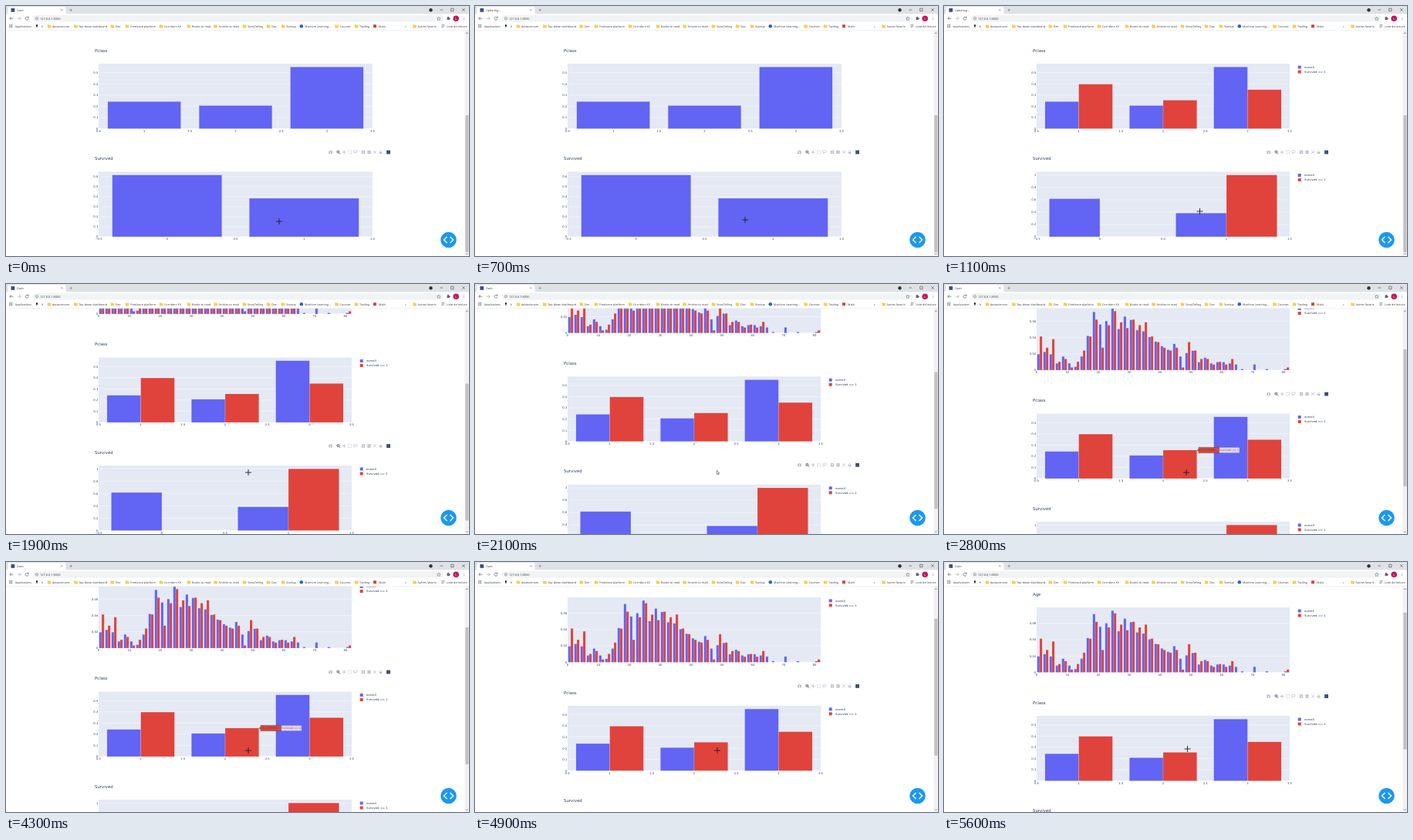
An HTML page for the animation above (5700 ms loop, 600 px wide and 325 px high).

```html
<!DOCTYPE html>
<html lang="en">
<head>
<meta charset="utf-8">
<title>Dash</title>
<style>
html, body { margin: 0; width: 100%; height: 100%; overflow: hidden; background: #fff; }
svg { display: block; width: 100vw; height: 100vh; }
text { text-rendering: geometricPrecision; white-space: pre; }
.plot text { font-family: "DejaVu Sans", sans-serif; fill: #2a3f5f; }
.browser text { font-family: "Open Sans", sans-serif; fill: #3c4043; }
</style>
</head>
<body>
<svg id="stage" viewBox="0 0 600 325" preserveAspectRatio="none"></svg>
<script>
const LOOP = 5700, STEP = 100;
const BLUE = '#6264f3', RED = '#e0433b', PLOT_BG = '#e4e9f4', INK = '#2a3f5f';
const LEFT = 120, PLOT_HEIGHT = 84.5;
const stage = document.getElementById('stage');

function add(parent, tag, attrs = {}, content) {
  const node = document.createElementNS('http://www.w3.org/2000/svg', tag);
  for (const name in attrs) node.setAttribute(name, attrs[name]);
  if (content !== undefined) node.textContent = content;
  parent.append(node);
  return node;
}
const group = (parent, attrs) => add(parent, 'g', attrs);
const rect = (parent, x, y, width, height, fill, more) =>
  add(parent, 'rect', { x, y, width, height, fill, ...more });
const circle = (parent, cx, cy, r, fill) => add(parent, 'circle', { cx, cy, r, fill });
const stroke = (parent, d, color, width = 0.6, more) =>
  add(parent, 'path', { d, stroke: color, 'stroke-width': width, fill: 'none', ...more });
// y is the vertical middle of the lower-case letters
const label = (parent, x, y, content, size = 3.75, more) =>
  add(parent, 'text', { x, y: y + size * 0.36, 'font-size': size, ...more }, content);
const show = (node, on) => node.setAttribute('opacity', Number(on));

// ---- charts ----

// Passengers per two-year age bin
const AGES_ALL = [14, 16, 14, 6, 12, 6, 3, 12, 30, 51, 40, 43, 54, 36, 47, 44, 35, 34, 29, 25, 21,
  18, 23, 12, 15, 17, 7, 11, 6, 7, 7, 6, 5, 1, 0, 5, 0, 1, 0, 0, 1];
const AGES_SURVIVED = [12, 8, 11, 3, 4, 1, 3, 7, 12, 18, 8, 16, 21, 17, 15, 18, 16, 17, 12, 10, 8,
  7, 8, 1, 10, 7, 4, 4, 2, 3, 2, 4, 0, 0, 0, 0, 0, 0, 0, 0, 1];
const share = counts => {
  const total = counts.reduce((a, b) => a + b);
  return counts.map(n => n / total);
};

const charts = {
  age: { title: 'Age', top: -66, range: [0, 82], first: 1, bin: 2, xTick: 10, yTick: 0.02,
    series: [share(AGES_ALL), share(AGES_SURVIVED)] },
  pclass: { title: 'Pclass', top: 75, range: [0.5, 3.5], first: 1, bin: 1, xTick: 0.5, yTick: 0.1,
    series: [share([216, 184, 491]), share([136, 87, 119])] },
  survived: { title: 'Survived', top: 215.5, range: [-0.5, 1.5], first: 0, bin: 1, xTick: 0.5, yTick: 0.2,
    series: [share([549, 342]), [0, 1]] }
};

function drawChart(parent, { title, top, range: [low, high], first, bin, xTick, yTick, series }) {
  const split = series.length > 1;
  const width = split ? 328 : 355;
  const bottom = top + PLOT_HEIGHT;
  const max = Math.max(...series.flat()) / 0.95;
  const toX = v => LEFT + (v - low) / (high - low) * width;
  const toY = v => bottom - v / max * PLOT_HEIGHT;
  const tickText = v => String(+v.toFixed(2)).replace('-', '\u2212');

  label(parent, 115, top - 17.2, title, 5.4);
  rect(parent, LEFT, top, width, PLOT_HEIGHT, PLOT_BG);
  for (let i = 0; i * yTick <= max; i++) {
    const y = toY(i * yTick);
    stroke(parent, `M${LEFT} ${y}h${width}`, '#fff', i ? 0.4 : 0.7);
    label(parent, 119.3, y, tickText(i * yTick), 3.75, { 'text-anchor': 'end' });
  }
  const barWidth = 0.8 * bin / series.length;
  series.forEach((values, s) => values.forEach((value, i) => {
    if (!value) return;
    const x = toX(first + i * bin - 0.4 * bin + s * barWidth);
    rect(parent, x, toY(value), barWidth / (high - low) * width, bottom - toY(value), s ? RED : BLUE,
      { stroke: PLOT_BG, 'stroke-width': 0.2 });
  }));
  for (let i = Math.ceil(low / xTick); i * xTick <= high; i++)
    label(parent, toX(i * xTick), bottom + 3, tickText(i * xTick), 3.75, { 'text-anchor': 'middle' });
  if (split) ['overall', 'Survived == 1'].forEach((name, i) => {
    const y = top + 4.5 + i * 6;
    rect(parent, 458.7, y - 2, 4, 4, i ? RED : BLUE);
    label(parent, 467, y, name);
  });
}

function drawModebar(parent, y) {
  const bar = group(parent, { transform: `translate(0 ${y})` });
  const faint = '#b4bac6';
  rect(bar, 418.2, -1.5, 4.8, 3.4, faint, { rx: 0.6 });
  rect(bar, 419.6, -2.1, 2, 1, faint);
  circle(bar, 420.6, 0.2, 1, '#fff');
  stroke(bar, 'M431.4 .6l2 2', '#6d7688', 1);
  add(bar, 'circle', { cx: 430.4, cy: -0.4, r: 1.6, fill: '#b4bac6', stroke: '#6d7688', 'stroke-width': 0.9 });
  stroke(bar, 'M435.7 0h5M438.2 -2.5v5', faint, 0.8);
  stroke(bar, 'M443.6 -2h4v4h-4z', faint, 0.6, { 'stroke-dasharray': '1 .5' });
  stroke(bar, 'M451.5 2.3c1.5-1.5-2-2-1-3.5s5-1.2 4.8.4s-2 1.6-4 1.2', faint, 0.7);
  for (const x of [463, 470.5]) {
    rect(bar, x - 2.1, -2.1, 4.2, 4.2, faint);
    stroke(bar, `M${x - 1.3} 0h2.6` + (x < 465 ? `M${x} -1.3v2.6` : ''), '#fff', 0.7);
  }
  stroke(bar, 'M476 -2l4 4M480 -2l-4 4', faint, 0.7);
  stroke(bar, 'M483.3 .2l2.3 -2l2.3 2', faint, 0.8);
  rect(bar, 484.2, 0, 2.8, 2, faint);
  rect(bar, 493.1, -2.4, 4.9, 4.9, '#3f4f75');
  return bar;
}

function drawHoverLabel(parent) {
  const tip = group(parent, { transform: 'translate(328 122.5)' });
  add(tip, 'path', { d: 'M0 0l2 -1.6v-2h26.5v7.2h-26.5v-2z', fill: '#d3473d', stroke: '#70413a', 'stroke-width': 0.5 });
  label(tip, 3, 0, '(2, 0.2543)', 3.75, { style: 'fill:#70413a' });
  rect(tip, 28.8, -3.4, 26, 6.8, '#dcd9ee');
  label(tip, 29.3, 0, 'Survived == 1', 3.4, { style: 'fill:' + RED });
  return tip;
}

// ---- page ----

rect(stage, 0, 0, 600, 325, '#fff');
const page = group(stage, { class: 'plot' });
const plain = group(page), split = group(page);
const { age, pclass, survived } = charts;
drawChart(plain, { ...pclass, series: pclass.series.slice(0, 1) });
drawChart(plain, { ...survived, yTick: 0.1, series: survived.series.slice(0, 1) });
[age, pclass, survived].forEach(chart => drawChart(split, chart));
const pclassBar = drawModebar(page, 49.5);
const survivedBar = drawModebar(page, 190);
const hoverLabel = drawHoverLabel(page);

rect(stage, 594.5, 32, 5.5, 293, '#f1f1f1');
stroke(stage, 'M596 36l1.3 -1.4l1.3 1.4M596 321.5l1.3 1.4l1.3 -1.4', '#606060', 0.7);
const thumb = rect(stage, 595.3, 142, 4.2, 178, '#c1c1c1');

circle(stage, 573.5, 304, 10.3, '#1b98f0');
stroke(stage, 'M571.5 300l-4 4l4 4M575.5 300l4 4l-4 4', '#fff', 1.5);

// ---- browser frame ----

const browser = group(stage, { class: 'browser' });
rect(browser, 0, 0, 600, 11, '#dee1e6');
rect(browser, 0, 10.3, 600, 21.5, '#fff');
add(browser, 'path', { d: 'M0 11q2.5 0 2.5 -2.5v-5q0 -2.5 2.5 -2.5h70q2.5 0 2.5 2.5v5q0 2.5 2.5 2.5z', fill: '#fff' });
rect(browser, 6.5, 3, 4.8, 4.8, '#3f4f75');
const tabTitle = label(browser, 14, 5.3, 'Dash');
const GREY = '#5f6368';
stroke(browser, 'M71.2 4l2.4 2.4M73.6 4l-2.4 2.4M82.5 5.3h3.4M84.2 3.6v3.4', GREY, 0.5);
circle(browser, 550.5, 5.2, 2.2, '#303134');
stroke(browser, 'M562.5 5h3.6M576.6 3.2h3.4v3.4h-3.4zM591.2 3.2l3.4 3.4M594.6 3.2l-3.4 3.4', '#222', 0.5);

rect(browser, 34.5, 12, 532.5, 8.4, '#f1f3f4', { rx: 4.2 });
stroke(browser, 'M9.5 16.2h-4.6m2 -2l-2 2l2 2', GREY, 0.7);
stroke(browser, 'M14.7 16.2h4.6m-2 -2l2 2l-2 2', '#a5a8ac', 0.7);
stroke(browser, 'M28.8 15a2 2 0 1 0 .3 1.8M29.2 13.6v1.7h-1.7', GREY, 0.7);
stroke(browser, 'M38.3 16.2a1.7 1.7 0 1 0 3.4 0a1.7 1.7 0 1 0 -3.4 0M40 15.9v1.2', GREY, 0.5);
label(browser, 44, 16.2, '127.0.0.1:8050', 3.9);
stroke(browser, 'M560.8 14l.7 1.5l1.7.2l-1.2 1.1l.3 1.7l-1.5-.8l-1.5.8l.3-1.7l-1.2-1.1l1.7-.2z', GREY, 0.5);
rect(browser, 571.5, 14.8, 3.2, 3.2, GREY);
circle(browser, 573, 14.6, 0.9, GREY);
circle(browser, 574.9, 16.4, 0.9, GREY);
circle(browser, 583.2, 16.2, 3.8, '#c2185b');
label(browser, 583.2, 16.2, 'L', 3.9, { 'text-anchor': 'middle', style: 'fill:#fff' });
for (const dy of [-1.6, 0, 1.6]) circle(browser, 593.5, 16.2 + dy, 0.45, GREY);

for (let i = 0; i < 9; i++)
  rect(browser, 4.2 + i % 3 * 1.5, 24 + Math.floor(i / 3) * 1.5, 1.1, 1.1, ['#d9534f', '#4a8af4', '#41a85f'][i % 3]);
rect(browser, 39, 24, 2, 3, '#222', { rx: 1 });
stroke(browser, 'M40 27v1.4', '#222');
circle(browser, 382.8, 26.2, 2.3, '#2a62c9');
rect(browser, 476, 24.2, 4, 4, '#d9453b');
stroke(browser, 'M564.4 24.6h4M564.4 26.2h4M564.4 27.8h2.5', GREY, 0.6);

const plainLinks = [[11.8, 'Applications'], [46, 'h'], [387, 'Machine Learning...'], [483, 'Mails'],
  [516.8, '\u00bb'], [571, 'Liste de lecture']];
const folders = [[60, 'datasciences'], [94.3, 'Top down dashboard'], [141.8, 'Dev'], [161, 'Freelance platform'],
  [205, 'Corridors KV'], [241, 'Books to read'], [275.5, 'Articles to read'], [313, 'StoryTelling'], [344, 'Doc'],
  [363, 'Startup'], [432.5, 'Courses'], [458, 'Trading'], [533.5, 'Autres favoris']];
for (const [x, name] of [...plainLinks, ...folders]) label(browser, x, 26.3, name);
for (const [x] of folders)
  add(browser, 'path', { d: `M${x - 6.2} 24.2h1.8l.6.6h2.2v3.6h-4.6z`, fill: '#f3cf55' });
stroke(browser, 'M525 23.8v5', '#d5d7da', 0.4);
stroke(browser, 'M0 31.7h600', '#dfe1e5', 0.5);

// ---- pointer ----

const pointer = group(stage);
const cross = stroke(pointer, 'M-4 0h8M0 -4v8', '#1c1c24', 0.9);
const arrow = add(pointer, 'path', { d: 'M-.6 -2.8v5l1.1-1l.9 1.8l.8-.4l-.9-1.7h1.5z',
  fill: '#fff', stroke: '#222', 'stroke-width': 0.5 });

// ---- motion ----

const scrollKeys = [[0, 0], [1600, 0], [1900, 20.5], [2300, 70], [2500, 90], [2600, 93.5],
  [4700, 93.5], [5000, 121], [5100, 125], [LOOP, 125]];
const pointerKeys = [[0, 354, 280], [700, 350, 278], [1100, 331.5, 267], [1500, 314, 245], [2200, 314, 245],
  [2300, 310, 243], [2600, 314, 245], [5400, 314, 245], [5600, 315.5, 243], [LOOP, 315.5, 243]];

function sample(keys, time) {
  const next = Math.max(1, keys.findIndex(key => key[0] > time));
  const [t0, ...from] = keys[next - 1], [t1, ...to] = keys[next];
  return from.map((v, i) => v + (to[i] - v) * (time - t0) / (t1 - t0));
}
const between = (time, from, to) => time >= from && time < to;

function render(time) {
  const [scroll] = sample(scrollKeys, time);
  const [x, y] = sample(pointerKeys, time);
  const overGap = scroll > 29 && scroll < 86;
  page.setAttribute('transform', `translate(0 ${scroll})`);
  thumb.setAttribute('y', 142 - scroll * 0.61);
  pointer.setAttribute('transform', `translate(${x} ${y})`);
  show(cross, !overGap);
  show(arrow, overGap);
  show(plain, time < 900);
  show(split, time >= 900);
  show(pclassBar, scroll > 50);
  show(survivedBar, scroll < 50 ? 1 : scroll < 75 ? 0.15 : 0);
  show(hoverLabel, between(time, 2700, 4700));
  tabTitle.textContent = between(time, 700, 1300) ? 'Updating...' : 'Dash';
}

const start = performance.now();
function tick() {
  const time = (performance.now() - start) % LOOP;
  render(Math.floor(time / STEP) * STEP);
  requestAnimationFrame(tick);
}
tick();
</script>
</body>
</html>
```
